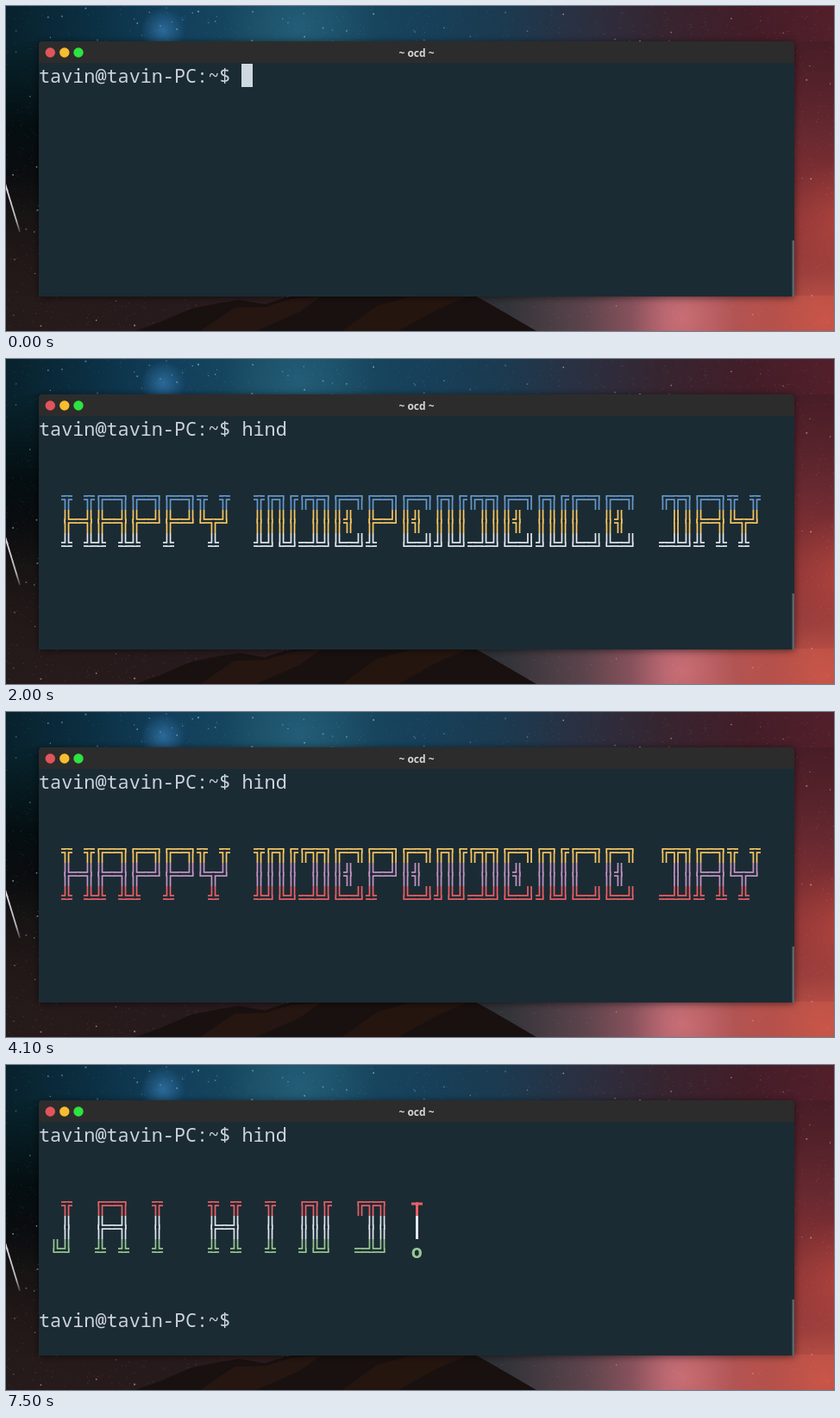
An HTML page with a canvas for the animation above (8 s loop, 960 by 377 pixels).

```html
<!DOCTYPE html>
<html lang="en">
<head>
<meta charset="utf-8">
<title>Terminal greeting</title>
<style>
html, body { margin: 0; width: 100%; height: 100%; overflow: hidden; background: #0c1a22; }
#stage { position: relative; width: 960px; height: 377px; overflow: hidden; }
canvas { position: absolute; left: 0; top: 0; }
.line {
  position: absolute; left: 38px; height: 27px; white-space: pre;
  font: 21.8px/27px "Noto Sans Mono", "DejaVu Sans Mono", monospace; color: #cdd3de;
}
#title {
  position: absolute; left: 38px; top: 42px; width: 876px; text-align: center;
  font: 700 12px/25px "Open Sans", "Noto Sans", sans-serif; color: #d6d6d6;
}
#cursor { position: absolute; width: 13px; height: 27px; background: #cdd8e0; }
</style>
</head>
<body>
<div id="stage">
  <canvas id="back" width="960" height="377"></canvas>
  <canvas id="art" width="960" height="377"></canvas>
  <div id="title">~ ocd ~</div>
  <div class="line" id="first" style="top:67px"></div>
  <div class="line" id="second" style="top:282px"></div>
  <div id="cursor"></div>
</div>
<script>
const W = 960, H = 377, LOOP = 8000;
const CELL_W = 13.08, CELL_H = 26.9, LEFT = 38, TOP = 67;
const TERM_BG = '#1b2b33';
const PROMPT = 'tavin@tavin-PC:~$ ', COMMAND = 'hind';
const $ = id => document.getElementById(id);

const RED = '#ec5f67', GREEN = '#99c794', YELLOW = '#fac863', BLUE = '#6699cc',
      MAGENTA = '#c594c5', CYAN = '#5fb3b3', WHITE = '#e2e7ee';
const SCHEMES = [[CYAN, BLUE, GREEN], [BLUE, YELLOW, WHITE], [YELLOW, MAGENTA, RED]];
const FLAG = [RED, WHITE, GREEN];

// Three-row letters in box-drawing characters
const LETTERS = {
  H: ['╦ ╦', '╠═╣', '╩ ╩'], A: ['╔═╗', '╠═╣', '╩ ╩'], P: ['╔═╗', '╠═╝', '╩  '],
  Y: ['╦ ╦', '╚╦╝', ' ╩ '], I: ['╦', '║', '╩'], N: ['╔╗╔', '║║║', '╝╚╝'],
  D: ['╔╦╗', ' ║║', '═╩╝'], E: ['╔═╗', '║╣ ', '╚═╝'], C: ['╔═╗', '║  ', '╚═╝'],
  J: [' ╦', ' ║', '╚╝'], '!': ['┬', '│', 'o']
};
const ARMS = { '═': 'LR', '║': 'UD', '╔': 'RD', '╗': 'LD', '╚': 'RU', '╝': 'LU',
               '╠': 'URD', '╣': 'ULD', '╦': 'LRD', '╩': 'LRU', '┬': 'LRD', '│': 'UD' };

function layout(text, letterGap, wordGap, indent) {
  const spell = (word, row) => [...word].map(ch => LETTERS[ch][row]).join(' '.repeat(letterGap));
  return [0, 1, 2].map(row => ' '.repeat(indent) +
    text.split(' ').map(word => spell(word, row)).join(' '.repeat(wordGap)));
}
const GREETING = layout('HAPPY INDEPENDENCE DAY', 0, 2, 2);
const CHEER = layout('JAI HIND!', 2, 4, 1);

const art = $('art').getContext('2d');

function drawArms(col, row, arms, half) {
  const x0 = Math.round(LEFT + col * CELL_W), x1 = Math.round(LEFT + (col + 1) * CELL_W);
  const y0 = Math.round(TOP + row * CELL_H), y1 = Math.round(TOP + (row + 1) * CELL_H);
  const cx = (x0 + x1) / 2, cy = y0 + 13;
  const box = (l, t, r, b) => art.fillRect(l, t, r - l, b - t);
  if (arms.includes('L')) box(x0, cy - half, cx + half, cy + half);
  if (arms.includes('R')) box(cx - half, cy - half, x1, cy + half);
  if (arms.includes('U')) box(cx - half, y0, cx + half, cy + half);
  if (arms.includes('D')) box(cx - half, cy - half, cx + half, y1);
}

function drawBanner(rows, colors) {
  const each = fn => rows.forEach((line, r) => [...line].forEach((ch, c) => fn(ch, c, r)));
  each((ch, c, r) => {
    art.fillStyle = colors[r];
    if (ch === 'o') {
      art.font = 'bold 21.8px "Noto Sans Mono", "DejaVu Sans Mono", monospace';
      art.fillText(ch, LEFT + c * CELL_W, 223.5);
    } else if (ARMS[ch]) {
      drawArms(c, r + 3, ARMS[ch], '┬│'.includes(ch) ? 1.5 : 2.9);
    }
  });
  // Hollow out the double strokes
  art.fillStyle = TERM_BG;
  each((ch, c, r) => {
    if (ARMS[ch] && !'┬│'.includes(ch)) drawArms(c, r + 3, ARMS[ch], 1.2);
  });
}

function paintBackdrop() {
  const g = $('back').getContext('2d');
  let seed = 77;
  const rnd = () => (seed = (seed * 16807) % 2147483647) / 2147483647;
  const strip = (x, y, w, h, vertical, colors) => {
    const grad = vertical ? g.createLinearGradient(0, y, 0, y + h) : g.createLinearGradient(x, 0, x + w, 0);
    colors.forEach((c, i) => grad.addColorStop(i / (colors.length - 1), c));
    g.fillStyle = grad;
    g.fillRect(x, y, w, h);
  };
  const glow = (x, y, r, rgb, a) => {
    const grad = g.createRadialGradient(x, y, 0, x, y, r);
    grad.addColorStop(0, `rgba(${rgb},${a})`);
    grad.addColorStop(1, `rgba(${rgb},0)`);
    g.fillStyle = grad;
    g.fillRect(x - r, y - r, 2 * r, 2 * r);
  };
  const poly = (color, pts) => {
    g.fillStyle = color;
    g.beginPath();
    pts.forEach(([x, y]) => g.lineTo(x, y));
    g.fill();
  };

  strip(0, 0, W, 60, false, ['#08212c', '#0b2f42', '#123f5c', '#17485f', '#184860', '#17405a',
    '#1b3a50', '#2b2f40', '#37242f', '#431d28', '#521f2a']);
  strip(0, 41, 60, 300, true, ['#08232d', '#06191f', '#040e11', '#0a0c0f', '#171413', '#211717', '#251a1a']);
  strip(900, 41, 60, 300, true, ['#481d27', '#54212a', '#642830', '#7a2e32', '#8c3536', '#963b3a', '#a84641']);
  strip(0, 336, W, 41, false, ['#251a1a', '#271a1b', '#271a1c', '#2a1b1e', '#2c1e22', '#2c2529',
    '#303338', '#5d444c', '#a85c68', '#b4524e', '#b84c42']);
  glow(182, 28, 26, '60,135,195', 0.6);
  glow(340, 25, 90, '60,140,170', 0.3);
  glow(970, 250, 70, '215,85,70', 0.4);
  glow(785, 362, 60, '245,140,140', 0.4);
  glow(950, 365, 60, '225,100,80', 0.4);

  for (let i = 0; i < 9000; i++) {
    const x = rnd() * W, y = rnd() * H, bright = rnd();
    const cool = x < 620 && y < 300;
    const big = bright > (cool ? 0.94 : 0.98);
    const alpha = big ? 0.35 + 0.5 * rnd() : 0.04 + 0.22 * bright ** 3;
    const s = big ? 1 + rnd() * 0.8 : 1;
    g.fillStyle = `rgba(${cool ? '135,200,225' : '235,165,165'},${alpha})`;
    g.fillRect(x, y, s, s);
  }

  poly('#19110f', [[150, 377], [178, 367], [215, 351], [245, 345], [270, 341], [300, 346],
    [325, 338], [345, 334], [540, 334], [560, 345], [615, 377]]);
  poly('#261611', [[225, 377], [265, 350], [302, 349], [330, 340], [365, 337], [340, 355], [290, 377]]);
  poly('#25150f', [[390, 377], [430, 348], [470, 337], [535, 337], [500, 352], [455, 377]]);

  const trail = g.createLinearGradient(0, 208, 16, 262);
  trail.addColorStop(0, '#e5dce6');
  trail.addColorStop(0.75, '#b9b3c0');
  trail.addColorStop(1, 'rgba(170,160,175,.3)');
  g.strokeStyle = trail;
  g.lineWidth = 1.8;
  g.beginPath();
  g.moveTo(-1, 206);
  g.lineTo(16, 262);
  g.stroke();

  // Window
  g.save();
  g.shadowColor = 'rgba(0,0,0,.55)';
  g.shadowBlur = 8;
  g.shadowOffsetY = 1;
  g.fillStyle = '#2c2c2c';
  g.beginPath();
  g.roundRect(38, 41, 876, 296, [4, 4, 0, 0]);
  g.fill();
  g.restore();
  g.fillStyle = TERM_BG;
  g.fillRect(38, 66, 876, 271);
  g.fillStyle = '#58666d';
  g.fillRect(911.5, 272, 2.5, 65);
  [[51.3, '#e0555b'], [67.8, '#f6bd30'], [84, '#2de341']].forEach(([x, c]) => {
    g.fillStyle = c;
    g.beginPath();
    g.arc(x, 54, 5.7, 0, 7);
    g.fill();
  });
}

function placeCursor(col, top, on) {
  const s = $('cursor').style;
  s.display = on ? 'block' : 'none';
  s.left = LEFT + col * CELL_W + 'px';
  s.top = top + 'px';
}

let shown = -1;
function render(now) {
  const tick = Math.floor((now % LOOP) / 100);
  if (tick !== shown) {
    shown = tick;
    const typed = Math.min(tick, COMMAND.length);
    const done = tick >= 57;
    $('first').textContent = PROMPT + COMMAND.slice(0, typed);
    $('second').textContent = done ? PROMPT : '';
    art.clearRect(0, 0, W, H);
    if (done) drawBanner(CHEER, FLAG);
    else if (tick >= 6) drawBanner(GREETING, SCHEMES[Math.floor(tick * 1.18 + 2.3) % 3]);
    if (done) placeCursor(PROMPT.length, 282, Math.floor((tick - 57) / 6) % 2 === 0);
    else placeCursor(PROMPT.length + typed, 67, tick < 5);
  }
  requestAnimationFrame(render);
}

paintBackdrop();
render(performance.now());
</script>
</body>
</html>
```
